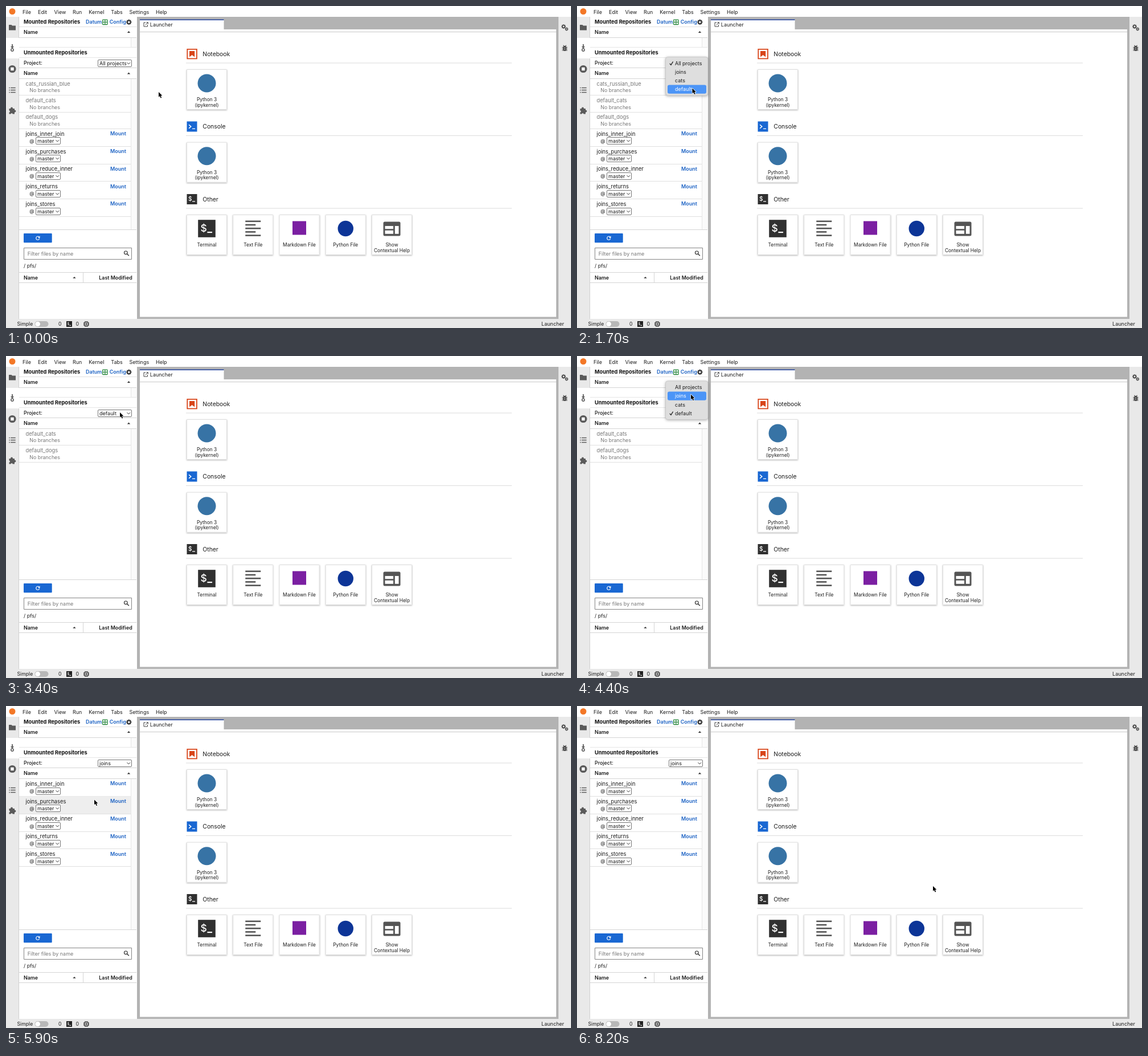
These frames come from a looping animation (992x565 px, 8.3 s). An HTML page with a canvas:

```html
<!DOCTYPE html>
<html lang="en">
<head>
<meta charset="utf-8">
<title>Launcher</title>
<style>
  html, body { margin: 0; width: 100%; height: 100%; overflow: hidden; background: #fff; }
  canvas { display: block; }
</style>
</head>
<body>
<canvas id="stage" width="992" height="565"></canvas>
<script>
const ctx = document.getElementById('stage').getContext('2d');
const LOOP = 8300;
const BLUE = '#1967d2', LINK = '#1c62c4', INK = '#1c1c1c', ICON = '#5a5a5a', DARK = '#303030';

// ---- drawing helpers ----
function rect(x, y, w, h, color) {
  ctx.fillStyle = color;
  ctx.fillRect(x, y, w, h);
}
function rounded(x, y, w, h, r, fill, stroke, width = 1) {
  ctx.beginPath();
  ctx.roundRect(x, y, w, h, r);
  if (fill) { ctx.fillStyle = fill; ctx.fill(); }
  if (stroke) { ctx.strokeStyle = stroke; ctx.lineWidth = width; ctx.stroke(); }
}
function circle(x, y, r, fill) {
  ctx.beginPath();
  ctx.arc(x, y, r, 0, Math.PI * 2);
  ctx.fillStyle = fill;
  ctx.fill();
}
function ring(x, y, r, color, width) {
  ctx.beginPath();
  ctx.arc(x, y, r, 0, Math.PI * 2);
  ctx.strokeStyle = color;
  ctx.lineWidth = width;
  ctx.stroke();
}
function trace(points) {
  ctx.beginPath();
  points.forEach(([x, y], i) => i ? ctx.lineTo(x, y) : ctx.moveTo(x, y));
}
function line(points, color, width = 1) {
  trace(points);
  ctx.strokeStyle = color;
  ctx.lineWidth = width;
  ctx.stroke();
}
function poly(points, color) {
  trace(points);
  ctx.closePath();
  ctx.fillStyle = color;
  ctx.fill();
}
function text(str, x, y, { size = 9.1, weight = 400, color = INK, align = 'left' } = {}) {
  ctx.font = `${weight} ${size}px Inter, "Liberation Sans", sans-serif`;
  ctx.textAlign = align;
  ctx.textBaseline = 'alphabetic';
  ctx.fillStyle = color;
  ctx.fillText(str, x, y);
}
const rule = (x, y, w, color = '#e0e0e0') => rect(x, y, w, 1, color);
const chevron = (x, y) => line([[x - 2.8, y - 1.3], [x, y + 1.5], [x + 2.8, y - 1.3]], '#333', 1);
const sortMark = (x, y) => poly([[x - 2.7, y + 1.5], [x, y - 1.4], [x + 2.7, y + 1.5]], '#333');

function select(x, y, w, h, label) {
  rounded(x + 0.5, y + 0.5, w - 1, h - 1, 1.5, '#fff', '#777');
  text(label, x + 3, y + h / 2 + 3.2);
  chevron(x + w - 5.7, y + h / 2);
}
function gear(x, y, r, color, hole) {
  for (let i = 0; i < 8; i++) {
    const a = i * Math.PI / 4;
    line([[x, y], [x + Math.cos(a) * r, y + Math.sin(a) * r]], color, r * 0.42);
  }
  circle(x, y, r * 0.76, color);
  circle(x, y, r * 0.38, hole);
}
function promptIcon(x, y, s, glyph, bg) {
  rect(x, y, s, s, bg);
  if (glyph === '$') {
    text('$', x + s * 0.14, y + s * 0.68, { size: s * 0.57, weight: 500, color: '#fff' });
  } else {
    line([[x + s * .2, y + s * .32], [x + s * .4, y + s * .5], [x + s * .2, y + s * .68]], '#fff', s * .09);
  }
  rect(x + s * 0.53, y + s * 0.68, s * 0.28, Math.max(1, s * 0.07), '#fff');
}

// ---- window frame ----
function drawMenuBar() {
  circle(11, 9.5, 5.5, '#f37726');
  [['File', 29], ['Edit', 56], ['View', 84.5], ['Run', 117], ['Kernel', 145.3],
   ['Tabs', 184.3], ['Settings', 216.5], ['Help', 263]]
    .forEach(([name, x]) => text(name, x, 13.7, { size: 9 }));
}

function drawSideBars() {
  rect(0, 19, 23, 530, '#e9e9e9');
  rect(0, 56, 23, 36, '#fff');
  rect(22, 19, 1, 37, '#cfcfcf');
  rect(22, 92, 1, 457, '#cfcfcf');
  rect(970, 19, 22, 530, '#e9e9e9');

  poly([[5, 33], [9.5, 33], [11, 34.5], [17, 34.5], [17, 42.5], [5, 42.5]], ICON);

  line([[11, 67], [11, 72]], ICON, 1.8);
  poly([[8, 71], [14, 71], [11, 74.5]], ICON);
  ring(11, 77, 2.2, ICON, 1.5);

  circle(11, 110.5, 6.6, ICON);
  rounded(8.3, 107.8, 5.4, 5.4, 0.5, '#fff');

  for (const y of [142.8, 146.8, 150.8]) {
    rect(5.3, y, 1.6, 1.5, ICON);
    rect(8.2, y, 8.5, 1.5, ICON);
  }

  rect(5.5, 180, 9.5, 9.5, ICON);
  circle(10, 179.5, 2, ICON);
  circle(15.3, 184.5, 2, ICON);
  circle(5.5, 185, 1.5, '#e9e9e9');
  circle(10, 189.5, 1.5, '#e9e9e9');

  gear(979, 36, 3.8, '#484848', '#e9e9e9');
  gear(984.3, 40.5, 2.9, '#484848', '#e9e9e9');

  rounded(978, 70, 6, 9, 3, '#484848');
  for (const y of [72, 74.7, 77.4]) rect(976.3, y, 9.4, 1, '#484848');
  line([[978.4, 68.8], [980, 70.5]], '#484848', 1.1);
  line([[983.6, 68.8], [982, 70.5]], '#484848', 1.1);
  rect(979.8, 73, 2.4, 0.9, '#ddd');
  rect(979.8, 75.7, 2.4, 0.9, '#ddd');
}

function drawStatusBar() {
  rect(0, 549, 992, 16, '#e9e9e9');
  text('Simple', 19.5, 561, { size: 8.7 });
  rounded(50.5, 553, 24, 10, 5, '#b8b8b8');
  circle(55.7, 558, 4.3, '#fff');
  text('0', 92, 561, { size: 8.7 });
  promptIcon(106, 553, 10, '$', '#222');
  text('0', 122.5, 561, { size: 8.7 });
  for (const d of [-2, 0, 2]) {
    rect(140.5 + d, 553, 1, 10, '#333');
    rect(136, 557.5 + d, 10, 1, '#333');
  }
  rounded(137.8, 554.8, 6.4, 6.4, 1, '#e9e9e9', '#333', 1.3);
  rect(139.7, 556.7, 2.6, 2.6, '#333');
  text('Launcher', 980, 561, { size: 9, align: 'right' });
}

// ---- launcher ----
function card(x, y, lines, drawIcon) {
  ctx.save();
  ctx.shadowColor = 'rgba(0,0,0,.28)';
  ctx.shadowBlur = 2.5;
  ctx.shadowOffsetY = 1;
  rect(x, y, 71, 71, '#fff');
  ctx.restore();
  rounded(x + 0.5, y + 0.5, 70, 70, 0.5, '#fff', '#dedede');
  drawIcon(x + 35.5, y + 24.5);
  lines.forEach((label, i) =>
    text(label, x + 35.5, y + 56 + i * 9.6, { size: 8.35, align: 'center' }));
}
function section(title, y) {
  text(title, 345.3, y + 3.7, { size: 10.4 });
  rule(316, y + 15.5, 572, '#dcdcdc');
}
function textFileIcon(x, y) {
  [27, 18, 27, 18, 27].forEach((w, i) => rect(x - 13.5, y - 14 + i * 6.2, w, 2.6, '#555'));
}
function helpIcon(x, y) {
  rounded(x - 15, y - 12, 30, 25, 2.5, '#555');
  rect(x - 12, y - 4.5, 14.5, 5.2, '#fff');
  rect(x - 12, y + 3.3, 14.5, 6, '#fff');
  rect(x + 5.3, y - 4.5, 6.7, 13.8, '#fff');
}

function drawLauncher() {
  rect(230, 19, 740, 530, '#b3b3b3');
  rect(235, 41, 731, 504.5, '#fff');
  rect(235, 24, 147.5, 18, '#fff');
  rect(235, 23.5, 147.5, 1.5, '#27479f');
  rule(235, 45, 731, '#c9c9c9');
  line([[245, 29], [242, 29], [242, 36], [248.5, 36], [248.5, 33]], '#444', 1);
  line([[244.8, 33.3], [249, 29]], '#444', 1);
  line([[246.3, 28.7], [249.3, 28.7], [249.3, 31.7]], '#444', 1);
  text('Launcher', 252.8, 35.8, { size: 9 });

  section('Notebook', 84);
  rounded(318.3, 75.8, 16.6, 16.6, 0, '#fff', '#d8451a', 1.8);
  poly([[322, 79], [331.2, 79], [331.2, 89.5], [326.6, 86], [322, 89.5]], '#d8451a');
  section('Console', 211.5);
  promptIcon(317.5, 202.5, 18, '>', BLUE);
  section('Other', 339);
  promptIcon(317.5, 330, 18, '$', DARK);

  const kernelIcon = (x, y) => circle(x, y, 16, '#3773a5');
  card(317, 111, ['Python 3', '(ipykernel)'], kernelIcon);
  card(317, 238.7, ['Python 3', '(ipykernel)'], kernelIcon);

  const tools = [
    [['Terminal'], (x, y) => promptIcon(x - 15.3, y - 15.3, 30.6, '$', DARK)],
    [['Text File'], textFileIcon],
    [['Markdown File'], (x, y) => rect(x - 12, y - 13, 24, 24, '#7b1fa2')],
    [['Python File'], (x, y) => circle(x, y, 13.7, '#0d3597')],
    [['Show', 'Contextual Help'], helpIcon],
  ];
  tools.forEach(([lines, icon], i) => card(317 + i * 81.25, 366, lines, icon));
}

// ---- repository panel ----
const JOINS = ['inner_join', 'purchases', 'reduce_inner', 'returns', 'stores'].map(n => 'joins_' + n);
const DEFAULTS = ['default_cats', 'default_dogs'];
const LISTS = {
  'All projects': ['cats_russian_blue', ...DEFAULTS, ...JOINS],
  joins: JOINS,
  default: DEFAULTS,
};
const PROJECTS = ['All projects', 'joins', 'cats', 'default'];

function drawRows(project, pointer) {
  let y = 127.5;
  for (const name of LISTS[project]) {
    const mountable = name.startsWith('joins');
    const h = mountable ? 30.8 : 29.3;
    const hovered = pointer && pointer.x > 23 && pointer.x < 219 && pointer.y >= y && pointer.y < y + h;
    if (mountable) {
      if (hovered) rect(23, y, 196, h, '#eeeeee');
      text(name, 34.5, y + 12.3, { size: 9.3 });
      text('Mount', 211, y + 11.8, { weight: 600, color: LINK, align: 'right', size: 9 });
      text('@', 41.3, y + 24.4, { size: 8.6 });
      select(52, Math.round(y + 15), 44, 13, 'master');
    } else {
      text(name, 34.5, y + 12.3, { size: 9.3, color: '#777' });
      text('No branches', 41.3, y + 23.7, { size: 8.9, color: '#777' });
    }
    y += h;
    rule(23, Math.round(y - 0.4), 196);
  }
}

function drawPanel(project, pointer) {
  const heading = { size: 9.25, weight: 700, color: '#111' };
  const column = { size: 8.9, weight: 600 };
  rect(23, 19, 206.5, 530, '#fff');

  text('Mounted Repositories', 31, 31.3, heading);
  text('Datum', 140, 31.3, { size: 9, weight: 600, color: LINK });
  rounded(169.7, 24.2, 8.3, 8.3, 0.5, '#fff', '#2d8a42', 1.3);
  rect(173.2, 24, 1.3, 8.6, '#2d8a42');
  rect(169.5, 27.7, 8.6, 1.3, '#2d8a42');
  text('Config', 181.7, 31.3, { size: 9, weight: 600, color: LINK });
  gear(215.8, 28.2, 4.7, '#333', '#fff');
  rule(23, 36, 206);
  text('Name', 31, 49, column);
  sortMark(215.5, 45.5);
  rule(23, 55, 206, '#d4d4d4');
  rect(219, 56, 10.5, 16, '#fafafa');
  rect(219, 56, 1, 16, '#e6e6e6');
  rule(23, 72, 206, '#e6e6e6');

  text('Unmounted Repositories', 31, 85, heading);
  rule(23, 90, 206, '#e6e6e6');
  text('Project:', 31, 102.8, { size: 8.9, weight: 500 });
  select(161, 94, 60, 13, project);
  rule(23, 108, 206, '#d4d4d4');
  text('Name', 31, 121.3, column);
  sortMark(215.5, 118);
  rule(23, 127, 206, '#d4d4d4');
  rect(219, 128, 10.5, 264, '#fafafa');
  rect(219, 128, 1, 264, '#e6e6e6');
  drawRows(project, pointer);

  rule(23, 392, 206, '#d4d4d4');
  rounded(31, 399, 49.7, 16.3, 1, BLUE);
  ctx.beginPath();
  ctx.arc(55.8, 407.3, 3, 0.2, Math.PI * 1.75);
  ctx.strokeStyle = '#fff';
  ctx.lineWidth = 1.1;
  ctx.stroke();
  poly([[59.5, 403.5], [59.5, 407], [56, 407]], '#fff');

  rounded(31.5, 424.5, 189, 20, 0, '#fff', '#858585');
  text('Filter files by name', 37.8, 437.8, { size: 9, color: '#777' });
  ring(210.3, 432.8, 2.8, '#333', 1.2);
  line([[212.3, 434.8], [215.8, 438.3]], '#333', 1.4);
  text('/ pfs/', 31, 459.3, { size: 8.9 });
  rule(23, 467, 206, '#d4d4d4');
  text('Name', 31, 479.8, column);
  sortMark(120, 476.3);
  rect(135, 468, 1, 17, '#d4d4d4');
  text('Last Modified', 221.7, 479.8, { ...column, align: 'right' });
  rule(23, 485, 206, '#d4d4d4');
}

// The checked entry always sits over the select box.
function drawDropdown(project, pointer) {
  const checked = PROJECTS.indexOf(project);
  const top = 93 - checked * 15.2;
  ctx.save();
  ctx.shadowColor = 'rgba(0,0,0,.35)';
  ctx.shadowBlur = 5;
  ctx.shadowOffsetY = 1;
  rounded(155.5, top - 3.5, 74.5, 67.5, 4, '#dedede');
  ctx.restore();
  rounded(155.5, top - 3.5, 74.5, 67.5, 4, null, '#c2c2c2', 0.7);
  PROJECTS.forEach((name, i) => {
    const y = top + i * 15.2;
    const active = pointer.y >= y && pointer.y < y + 15.2;
    const color = active ? '#fff' : INK;
    if (active) rounded(159, y, 68, 15.2, 3, '#4c95f7');
    if (i === checked) line([[162.8, y + 8], [165, y + 10.4], [168.6, y + 4.6]], color, 1.2);
    text(name, 172, y + 10.8, { size: 9, color });
  });
}

function drawPointer({ x, y }) {
  trace([[0, 0], [0, 8.8], [2, 7], [3.6, 10.6], [5.2, 9.9], [3.7, 6.4], [6.3, 6.2]]
    .map(([dx, dy]) => [x + dx, y + dy]));
  ctx.closePath();
  ctx.lineJoin = 'round';
  ctx.lineWidth = 1.4;
  ctx.strokeStyle = '#fff';
  ctx.stroke();
  ctx.fillStyle = '#000';
  ctx.fill();
  ctx.lineJoin = 'miter';
}

// ---- motion ----
const PATH = [
  [0, 268, 151], [250, 268, 151], [900, 200, 100], [1150, 200, 100],
  [1650, 202.5, 144.5], [2750, 202.5, 144.5], [3400, 200, 99], [3750, 200, 99],
  [4300, 200, 67.5], [4750, 200, 67.5], [5350, 145, 230.5], [5450, 145, 230.5],
  [5900, 155, 164.5], [6300, 155, 164.5], [7500, 625, 316], [LOOP, 625, 316],
];
function pointerAt(t) {
  const i = PATH.findIndex(([time]) => time > t);
  const [t0, x0, y0] = PATH[i - 1], [t1, x1, y1] = PATH[i];
  const u = (t - t0) / (t1 - t0), e = u * u * (3 - 2 * u);
  return { x: x0 + (x1 - x0) * e, y: y0 + (y1 - y0) * e };
}
const within = (t, a, b) => t >= a && t < b;

function draw(now) {
  const t = now % LOOP;
  const pointer = pointerAt(t);
  const open = within(t, 1000, 1900) || within(t, 3600, 4600);
  const project = t < 2800 ? 'All projects' : t < 4900 ? 'default' : 'joins';
  rect(0, 0, 992, 565, '#fff');
  drawMenuBar();
  drawSideBars();
  drawLauncher();
  drawPanel(project, open ? null : pointer);
  drawStatusBar();
  if (open) drawDropdown(project, pointer);
  drawPointer(pointer);
}

const start = performance.now();
function tick() {
  draw(performance.now() - start);
  requestAnimationFrame(tick);
}
tick();
</script>
</body>
</html>
```
